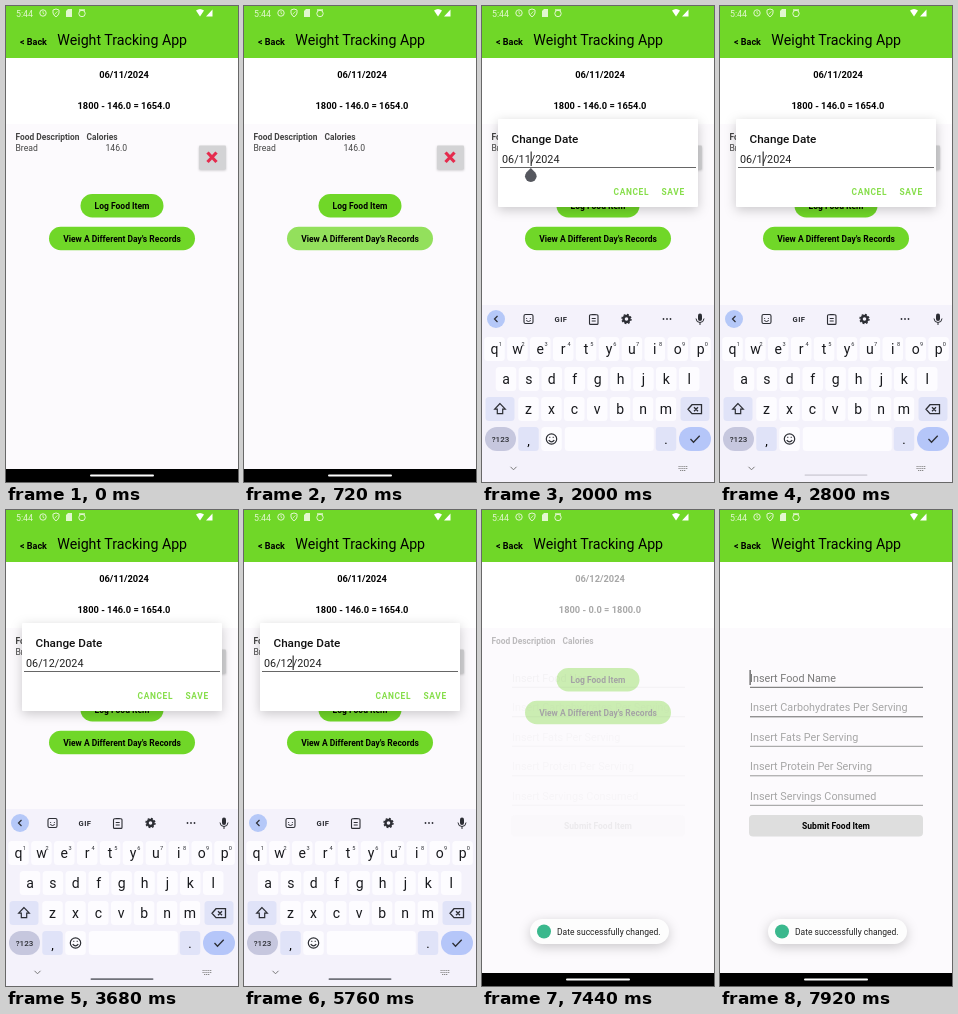
Recreate the animation shown at these times as an HTML page. Size 232 px wide and 476 px high, loop 8000 ms.

```html
<!DOCTYPE html>
<html lang="en">
<head>
<meta charset="utf-8">
<title>Weight Tracking App</title>
<style>
  html, body { margin: 0; width: 100%; height: 100%; overflow: hidden; background: #fff; }
  svg { display: block; width: 232px; height: 476px; font-family: Roboto, sans-serif; }
  .shadow { filter: drop-shadow(0 3px 6px #0003); }
  .soft { filter: drop-shadow(0 1px 1px #0003); }
</style>
</head>
<body>
<svg id="stage" viewBox="0 0 232 476"></svg>
<script>
const GREEN = '#70d728', INK = '#000';
const LOOP = 8000;

// y is the middle of the capital letters
const text = (x, y, s, size, o = {}) =>
  `<text x="${x}" y="${y + size * 0.36}" font-size="${size}" font-weight="${o.w || 400}"
    fill="${o.c || INK}" text-anchor="${o.a || 'start'}" letter-spacing="${o.ls || 0}"
    ${o.id ? `id="${o.id}"` : ''}>${s}</text>`;
const mid = (x, y, s, size, o = {}) => text(x, y, s, size, { a: 'middle', ...o });
const rect = (x, y, w, h, c, r = 0, more = '') =>
  `<rect x="${x}" y="${y}" width="${w}" height="${h}" rx="${r}" fill="${c}" ${more}/>`;
const circle = (x, y, r, c, more = '') =>
  `<circle cx="${x}" cy="${y}" r="${r}" fill="${c}" ${more}/>`;
const line = (d, c, w = 1, more = '') =>
  `<path d="${d}" fill="none" stroke="${c}" stroke-width="${w}" ${more}/>`;
const group = (id, ...parts) => `<g id="${id}">${parts.join('')}</g>`;

const pill = (id, x, y, w, h, label) =>
  rect(x, y, w, h, GREEN, h / 2, `id="${id}"`) +
  mid(x + w / 2, y + h / 2, label, 8.5, { w: 700 });

function header() {
  const white = '#e2f7cf';
  return rect(0, 0, 232, 52, GREEN) +
    text(10, 7.5, '5:44', 8.8, { c: white }) +
    circle(37, 7, 3.2, 'none', `stroke="${white}"`) + line('M37 5v2.3l1.4 .8', white, .8) +
    line('M47 4l3 -1 3 1v3q-.6 2.6 -3 3.8q-2.4 -1.2 -3 -3.8z', white) + line('M48.6 8.4l2.8 -3', white, .8) +
    `<path d="M62 3h4v8h-6v-6z" fill="${white}"/>` +
    circle(76, 7.5, 3.2, 'none', `stroke="${white}"`) + line('M73 4h6', white, 1.4) +
    `<path d="M190 4.6q4 -3.4 8 0l-4 5.8z M200 10.4l6.5 -7v7z" fill="#fff"/>` +
    text(14, 35.5, '&lt; Back', 9, { w: 700 }) +
    text(51.3, 34, 'Weight Tracking App', 14.2);
}

function dayScreen() {
  const dark = '#444';
  return mid(118, 68.5, '06/11/2024', 9.3, { w: 700, id: 'day' }) +
    mid(118, 100, '', 9.3, { w: 700, id: 'sum' }) +
    text(9.5, 130.5, 'Food Description', 8.4, { w: 700, c: dark }) +
    text(80.5, 130.5, 'Calories', 8.4, { w: 700, c: dark }) +
    group('row',
      text(9.5, 142, 'Bread', 8.6, { c: dark }),
      text(99.5, 142, '146.0', 8.6, { c: dark }),
      rect(193, 139.5, 27, 24, '#d3d3d5', 1, 'class="soft"'),
      line('M201.5 146.5l9 9.5m0 -9.5l-9 9.5', '#e52b4d', 3.2)) +
    group('buttons',
      pill('log', 74.5, 188, 83, 23.5, 'Log Food Item'),
      pill('view', 43, 220.8, 146, 23.5, 'View A Different Day\'s Records'));
}

function formScreen() {
  const hints = ['Food Name', 'Carbohydrates Per Serving', 'Fats Per Serving',
    'Protein Per Serving', 'Servings Consumed'];
  return hints.map((h, i) => {
    const y = 168 + i * 29.5;
    return text(30, y, 'Insert ' + h, 10.8, { c: i ? '#a6a6a6' : '#7b7b7b' }) +
      rect(30, y + 8.8, 173, 1, i > 1 ? '#989898' : '#666');
  }).join('') +
    rect(29.6, 160, 1, 15, '#333', 0, 'id="formCaret"') +
    rect(29, 305, 174, 21.5, '#dedede', 4) +
    mid(116, 315.5, 'Submit Food Item', 8.5, { w: 700 });
}

function dialog() {
  const link = { w: 700, c: '#86de4a', ls: .65 };
  return rect(16, 194, 200, 88, '#fff', 1, 'class="shadow"') +
    rect(174, 256, 35, 21, '#cdeeb8', 3, 'id="savePress"') +
    text(29.5, 213.8, 'Change Date', 11.7, { w: 500, c: '#111' }) +
    text(20, 234.5, '', 10.8, { c: '#222', id: 'field' }) +
    rect(18, 242, 196, 1, '#666') +
    text(131.5, 266.5, 'CANCEL', 8.4, link) + text(179.5, 266.5, 'SAVE', 8.4, link) +
    rect(48.6, 226.5, 1.1, 14.5, '#222', 0, 'id="caret"') +
    `<path id="handle" d="M48.8 243l4.2 4.2a5.8 5.8 0 1 1 -8.4 0z" fill="#55575e"/>`;
}

function keyboard() {
  const ink = '#2c2e34', tint = '#e0e3f8';
  const key = (x, y, w, c = '#fdfcff', r = 3.5) => rect(x - w / 2, y - 12, w, 24, c, r);
  const row = (letters, x0, y) => [...letters].map((ch, i) => {
    const x = x0 + i * 22.9;
    const digit = y < 350 ? text(x + 4.2, y - 5.5, (i + 1) % 10, 5.6, { c: ink }) : '';
    return key(x, y, 20.5) + mid(x, y, ch, 14, { c: '#18191d' }) + digit;
  }).join('');
  const gear = circle(144.5, 313, 3, 'none', `stroke="${ink}" stroke-width="2.4"`) +
    circle(144.5, 313, 4.5, 'none', `stroke="${ink}" stroke-width="1.4" stroke-dasharray="1.8 1.73"`);
  return rect(0, 299, 232, 177, '#f4f2fb') +
    circle(14, 313, 9, '#b5c8f8') + line('M15.5 310l-3 3 3 3', ink, 1.2) +
    rect(42, 308.5, 9, 9, 'none', 1.5, `stroke="${ink}" stroke-width="1.1"`) +
    line('M44.2 312.5h.9m2.8 0h.9m-4.6 2q2.3 2 4.6 0', ink) +
    mid(79, 313.3, 'GIF', 7.6, { w: 700, c: ink, ls: .5 }) +
    rect(107.5, 308.8, 8.5, 9.6, 'none', 1, `stroke="${ink}" stroke-width="1.1"`) +
    line('M109.7 308.5h4m-4 4h4m-4 2.5h4', ink, 1.2) + gear +
    [181.5, 185, 188.5].map(x => circle(x, 313, .9, ink)).join('') +
    rect(216, 307.5, 4, 7.4, ink, 2) + line('M214 312.5q.2 4 4 4t4 -4m-4 4v2.5', ink) +
    row('qwertyuiop', 12.5, 343) + row('asdfghjkl', 24, 373) + row('zxcvbnm', 46.5, 403) +
    key(18, 403, 29, tint) + line('M18 397.5l-5.3 5.6h2.6v4.6h5.4v-4.6h2.6z', ink, 1.2) +
    key(213, 403, 29, tint) + line('M210 398.7h9.5v9h-9.5l-4 -4.5zm2 2.5l4 4m0 -4l-4 4', ink, 1.3) +
    key(18.5, 433, 31, '#c6c7de', 12) + mid(18.5, 433, '?123', 8, { w: 500, c: ink }) +
    key(46.5, 433, 20.5, tint) + mid(46.5, 434, ',', 13) +
    key(69.5, 433, 20.5) + circle(69.5, 433, 5.2, 'none', `stroke="${ink}" stroke-width="1.2"`) +
    line('M67.3 431.4h1m2.4 0h1m-5 2.7q2.8 3.4 5.6 0', ink, 1.2) +
    key(127.3, 433, 89) + key(184, 433, 20.5, tint) + mid(184, 433, '.', 13) +
    key(213, 433, 32, '#b5c6f9', 12) + line('M208.5 433l3 3.2 6.2 -6.4', ink, 1.3) +
    line('M28.5 460.8l3 3 3 -3', '#777', 1) +
    line('M196.5 460.5h9m-9 2h9m-7.5 2h6', '#888', 1.2, 'stroke-dasharray="1.2 .7"') +
    rect(84.5, 468.2, 63, 1.8, '#70727a', .9, 'id="homeBar"');
}

const toast = () => rect(48, 409, 139, 25, '#fdfdfd', 12.5, 'class="shadow"') +
  circle(62, 421.5, 7, '#3ab88d') +
  text(75, 421.5, 'Date successfully changed.', 8.5, { c: '#222' });

document.getElementById('stage').innerHTML =
  rect(0, 0, 232, 476, '#fcfafd') + rect(0, 52, 232, 66, '#fff') +
  group('dayView', dayScreen()) + group('form', formScreen()) + header() +
  group('dialog', dialog()) + group('keys', keyboard()) + group('toast', toast()) +
  group('nav', rect(0, 463, 232, 13, '#000'), rect(84, 468.4, 64, 2, '#fff', 1));

const el = {};
document.querySelectorAll('[id]').forEach(e => el[e.id] = e);

const ramp = (t, a, b) => {
  const p = Math.min(1, Math.max(0, (t - a) / (b - a)));
  return p * p * (3 - 2 * p);
};
const within = (t, a, b) => t >= a && t < b;
const fade = (name, v) => {
  el[name].style.opacity = v;
  el[name].style.display = v > 0 ? '' : 'none';
};
const shift = (name, y) => el[name].setAttribute('transform', `translate(0 ${y})`);
const say = (name, s) => { if (el[name].textContent !== s) el[name].textContent = s; };

function draw(t) {
  const saved = t >= 6240;
  say('day', saved ? '06/12/2024' : '06/11/2024');
  say('sum', saved ? '1800 - 0.0 = 1800.0' : '1800 - 146.0 = 1654.0');
  fade('row', saved ? 0 : 1);
  shift('buttons', saved ? -30 : 0);
  el.view.setAttribute('fill', within(t, 640, 800) ? '#93e05c' : GREEN);
  el.log.setAttribute('fill', within(t, 7280, 7400) ? '#93e05c' : GREEN);

  // the closing dialog and keyboard drop fast, then thin out slowly
  const leave = 1 - .9 * ramp(t, 6160, 6480) - .1 * ramp(t, 6480, 7280);
  const rise = ramp(t, 1680, 1960);
  fade('dialog', ramp(t, 720, 1000) * leave);
  shift('dialog', -81 * rise);
  fade('keys', rise && leave);
  shift('keys', 177 * (1 - rise));
  fade('homeBar', ramp(t, 2400, 3680));
  fade('nav', 1 - ramp(t, 1680, 1800) + ramp(t, 6160, 6400));

  say('field', t < 2640 ? '06/11/2024' : t < 3040 ? '06/1/2024' : '06/12/2024');
  const blink = within(t, 1920, 3200) || within(t, 4080, 5280) || within(t, 5760, 6240);
  fade('caret', blink ? 1 : 0);
  el.caret.setAttribute('x', within(t, 2640, 3040) ? 42.6 : 48.6);
  fade('handle', within(t, 1920, 2640) ? 1 : 0);
  fade('savePress', within(t, 6000, 6240) ? 1 : 0);

  fade('toast', ramp(t, 6400, 6640));
  fade('dayView', 1 - ramp(t, 7320, 7520));
  fade('form', ramp(t, 7400, 7680));
  fade('formCaret', t >= 7600 ? 1 : 0);
}

const start = performance.now();
function tick() {
  draw((performance.now() - start) % LOOP);
  requestAnimationFrame(tick);
}
tick();
</script>
</body>
</html>
```
